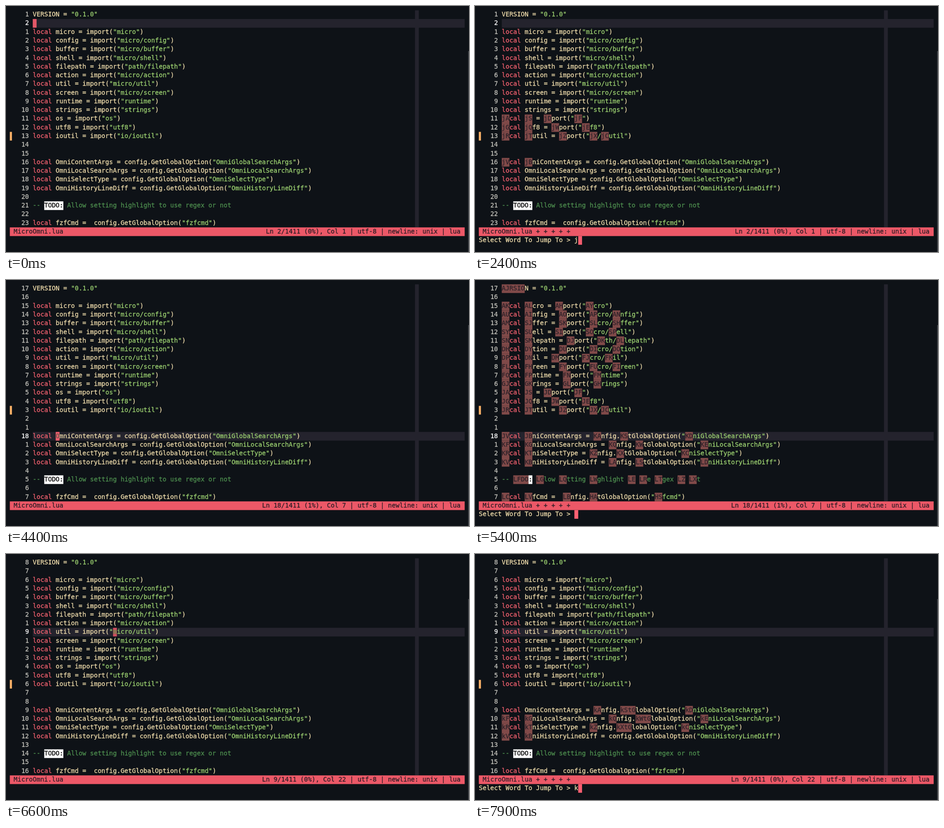
An HTML page that plays this animation: 1026x546 px, repeating every 8000 ms.

```html
<!DOCTYPE html>
<html lang="en">
<head>
<meta charset="utf-8">
<title>Word jump in a text editor</title>
<style>
  html, body { margin: 0; width: 100%; height: 100%; overflow: hidden; background: #0e1217; }
  svg { display: block; width: 1026px; height: 546px; }
  text {
    font: 14.069px "DejaVu Sans Mono", "Noto Sans Mono", monospace;
    font-variant-ligatures: none;
    white-space: pre;
    stroke-width: 0.3px;
  }
</style>
</head>
<body>
<svg viewBox="0 0 1026 546">
  <rect width="1026" height="546" fill="#0e1217"/>
  <rect x="1024" y="100" width="2" height="446" fill="#3f4247"/>
  <g id="screen"></g>
  <g id="cursor"></g>
</svg>
<script>
const LOOP = 8000, X0 = 8.5, Y0 = 9.6, CW = 8.47, RH = 19.27, BASE = 13.6;
const GUTTER = 6, COLS = 119, STATUS_ROW = 25;
const C = {
  bg: '#0e1217', line: '#24232d', cream: '#f0ddac', key: '#f2616f', str: '#9dd271',
  note: '#4e8f4f', num: '#c4c3bc', white: '#ffffff', bar: '#ec5867', barText: '#2c1c25',
  cursor: '#ff6173', label: '#814a49', labelText: '#2d2229', mark: '#fbb268'
};

const imports = ['micro micro', 'config micro/config', 'buffer micro/buffer', 'shell micro/shell',
  'filepath path/filepath', 'action micro/action', 'util micro/util', 'screen micro/screen',
  'runtime runtime', 'strings strings', 'os os', 'utf8 utf8', 'ioutil io/ioutil'];
const options = ['OmniContentArgs OmniGlobalSearchArgs', 'OmniLocalSearchArgs OmniLocalSearchArgs',
  'OmniSelectType OmniSelectType', 'OmniHistoryLineDiff OmniHistoryLineDiff'];
const assign = call => pair => {
  const [name, arg] = pair.split(' ');
  return `local ${name} = ${call}("${arg}")`;
};
const lines = [
  'VERSION = "0.1.0"', '', ...imports.map(assign('import')), '', '',
  ...options.map(assign('config.GetGlobalOption')), '',
  '-- TODO: Allow setting highlight to use regex or not', '',
  'local fzfCmd =  config.GetGlobalOption("fzfcmd")'
];

// Two-letter jump labels, alternating hands
const pairs = (firsts, seconds) => [...firsts].flatMap(a => [...seconds].map(b => a + b));
const codes = [...pairs('ASDF', 'JKLHYUIOPNM'), ...pairs('G', 'JKLH'), ...pairs('JKLH', 'ASDFGQWERTZXCVB')];
let used = 0;
const jumps = lines.map(s => [...s.matchAll(/[A-Za-z0-9]{2,}/g)]
  .map(m => ({ col: m.index, word: m[0], code: codes[used++] })));

// prompt: null when closed, otherwise the typed text
const states = [
  { at: 0, row: 1, col: 0, prompt: null },
  { at: 400, row: 1, col: 0, prompt: '' },
  { at: 2200, row: 1, col: 0, prompt: 'j' },
  { at: 3600, row: 17, col: 6, prompt: null },
  { at: 4700, row: 17, col: 6, prompt: '' },
  { at: 5600, row: 17, col: 6, prompt: 'f' },
  { at: 5800, row: 8, col: 21, prompt: null },
  { at: 6700, row: 8, col: 21, prompt: '' },
  { at: 7800, row: 8, col: 21, prompt: 'k' }
];
const BLINK = 1600;
const blinkStarts = [-1350, 350, 2250, 4200, 5350, 6700, 7800];

const x = col => X0 + col * CW;
const y = row => Y0 + row * RH;
const esc = s => s.replace(/&/g, '&amp;').replace(/</g, '&lt;').replace(/>/g, '&gt;');
const box = (col, row, cols, fill, rows = 1) =>
  `<rect x="${x(col)}" y="${y(row)}" width="${cols * CW}" height="${rows * RH}" fill="${fill}"/>`;
const label = (col, row, s, fill, bold) =>
  `<text x="${x(col)}" y="${y(row) + BASE}" fill="${fill}" stroke="${fill}"` +
  `${bold ? ' font-weight="700"' : ''}>${esc(s)}</text>`;

function styledCells(s) {
  const cells = [...s].map(ch => ({ ch, fg: C.cream, bg: '', bold: false }));
  const paint = (re, style) => {
    for (const m of s.matchAll(re))
      for (let i = 0; i < m[0].length; i++) Object.assign(cells[m.index + i], style);
  };
  paint(/\blocal\b/g, { fg: C.key });
  paint(/"[^"]*"/g, { fg: C.str });
  paint(/--.*/g, { fg: C.note });
  paint(/TODO:/g, { fg: '#000000', bg: C.white, bold: true });
  return cells;
}

function labelWidth(word, typed) {
  if (word === 'VERSION') return 6;
  if (word === 'TODO') return 4;
  return typed === 'k' && word.startsWith('Get') ? 4 : 2;
}

function codeLine(row, prompt) {
  const cells = styledCells(lines[row]);
  if (prompt !== null) for (const { col, word, code } of jumps[row]) {
    if (!code.toLowerCase().startsWith(prompt)) continue;
    const shown = prompt + code.slice(prompt.length);
    for (let i = 0; i < labelWidth(word, prompt); i++) {
      const cell = cells[col + i];
      Object.assign(cell, { ch: shown[i] || cell.ch, fg: C.labelText, bg: C.label, bold: false });
    }
  }
  let out = '';
  for (let a = 0, b; a < cells.length; a = b) {
    const { fg, bg, bold } = cells[a];
    for (b = a + 1; b < cells.length && cells[b].fg === fg && cells[b].bg === bg; b++);
    const run = cells.slice(a, b).map(c => c.ch).join('');
    if (bg) out += box(GUTTER + a, row, b - a, bg);
    out += label(GUTTER + a, row, run, fg, bold);
  }
  return out;
}

function drawScreen({ row, col, prompt }) {
  let out = box(GUTTER, row, COLS - GUTTER, C.line) + box(GUTTER + 100, 0, 1, C.line, STATUS_ROW);
  lines.forEach((_, i) => {
    const here = i === row;
    const num = String(here ? row + 1 : Math.abs(i - row));
    out += label(5 - num.length, i, num, here ? C.white : C.num, here) + codeLine(i, prompt);
  });
  out += box(0, 14, 0.55, C.mark);

  const total = 1411, percent = Math.floor((row + 1) / total * 100);
  const info = `Ln ${row + 1}/${total} (${percent}%), Col ${col + 1} | utf-8 | newline: unix | lua`;
  out += box(0, STATUS_ROW, COLS, C.bar);
  out += label(1, STATUS_ROW, 'MicroOmni.lua' + (prompt === null ? '' : ' +'.repeat(5)), C.barText);
  out += label(COLS - 1 - info.length, STATUS_ROW, info, C.barText);
  if (prompt !== null) out += label(0, STATUS_ROW + 1, 'Select Word To Jump To > ' + prompt, C.cream);
  return out;
}

// Blend in linear light
function mix(from, to, k) {
  const part = (c, i) => parseInt(c.slice(1 + 2 * i, 3 + 2 * i), 16) ** 2.2;
  const rgb = [0, 1, 2].map(i => Math.round((part(from, i) * (1 - k) + part(to, i) * k) ** (1 / 2.2)));
  return `rgb(${rgb})`;
}

function drawCursor({ row, col, prompt }, t) {
  const start = blinkStarts.filter(s => s <= t).pop();
  const k = (1 + Math.cos((t - start) / BLINK * 2 * Math.PI)) / 2;
  if (prompt !== null) return box(25 + prompt.length, STATUS_ROW + 1, 1, mix(C.bg, C.cursor, k));
  const cell = styledCells(lines[row])[col];
  return box(GUTTER + col, row, 1, mix(C.line, C.cursor, k)) +
    (cell ? label(GUTTER + col, row, cell.ch, mix(cell.fg, C.bg, k)) : '');
}

const screenEl = document.getElementById('screen');
const cursorEl = document.getElementById('cursor');
let current, lastTick;

function render(time) {
  const t = Math.floor(time % LOOP / 100) * 100;
  if (t === lastTick) return;
  lastTick = t;
  const state = states.filter(s => s.at <= t).pop();
  if (state !== current) {
    current = state;
    screenEl.innerHTML = drawScreen(state);
  }
  cursorEl.innerHTML = drawCursor(state, t);
}

const began = performance.now();
function tick() {
  render(performance.now() - began);
  requestAnimationFrame(tick);
}
tick();
</script>
</body>
</html>
```
